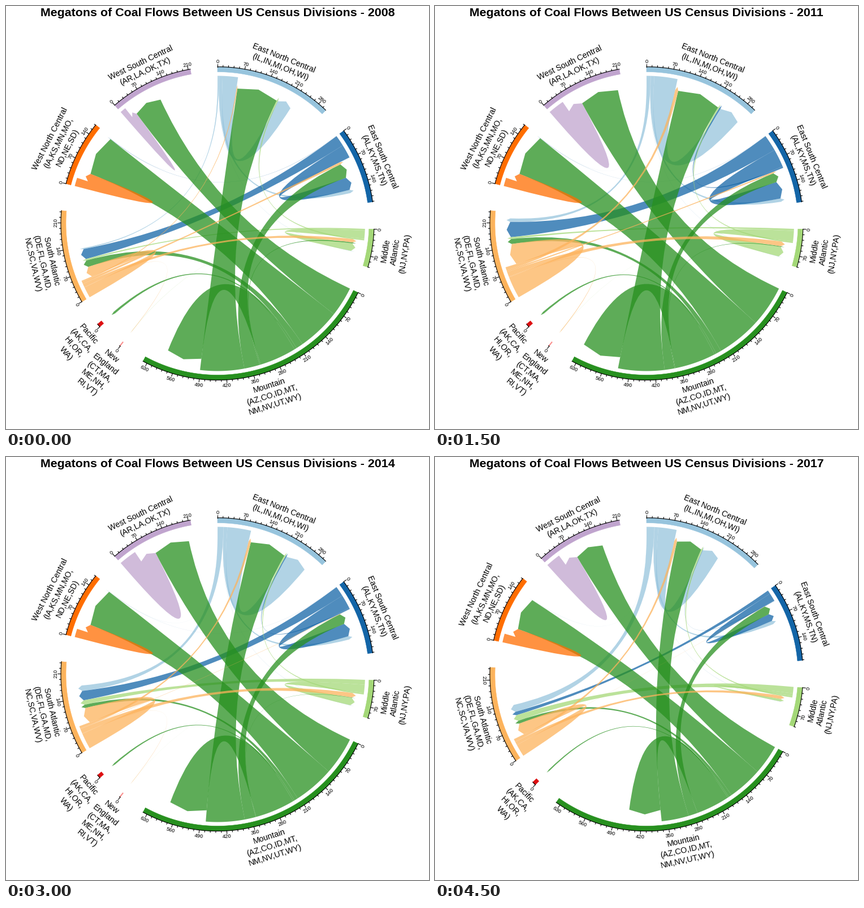
These frames come from a looping animation (748x748 px, 5 s). A matplotlib script:

```python
import numpy as np
import matplotlib.pyplot as plt
from matplotlib.animation import FuncAnimation
from matplotlib.patches import PathPatch, Polygon
from matplotlib.path import Path

SIZE, DPI = 748, 100
CX, CY = 374, 384.5
R_OUT, R_IN = 277, 268                  # coloured ring
R_FROM, R_TO, R_TIP = 261, 241, 247.5   # link start, arrow base, arrow tip
GAP = 10
UNIT = 0.1438                           # degrees per megaton with nine sectors
PT = 72 / DPI
FONT = "Liberation Sans"

# key: (arc in degrees, colour, label lines)
SECTORS = {
    "ENC": (43.7, "#97c4dd", "East North Central\n(IL,IN,MI,OH,WI)"),
    "ESC": (28.4, "#1365a7", "East South Central\n(AL,KY,MS,TN)"),
    "MA": (14.1, "#a4d878", "Middle\nAtlantic\n(NJ,NY,PA)"),
    "MT": (92.2, "#27901f", "Mountain\n(AZ,CO,ID,MT,\nNM,NV,UT,WY)"),
    "NE": (0.3, "#fa8a89", "New\nEngland\n(CT,MA,\nME,NH,\nRI,VT)"),
    "PA": (1.3, "#dd0f11", "Pacific\n(AK,CA,\nHI,OR,\nWA)"),
    "SA": (34.7, "#fdb35c", "South Atlantic\n(DE,FL,GA,MD,\nNC,SC,VA,WV)"),
    "WNC": (24.3, "#ff6d00", "West North Central\n(IA,KS,MN,MO,\nND,NE,SD)"),
    "WSC": (31.0, "#c0a4ce", "West South Central\n(AR,LA,OK,TX)"),
}
KEYS = list(SECTORS)

# Link widths in degrees: one value is constant, two are a steady trend,
# four are the levels of the market's phases 0 to 3.
FLOWS = {
    "ENC": dict(WNC=[.05], SA=[.45, 1.5, 2.3, 2.9], MA=[.1], ESC=[1.4],
                ENC=[6, 9.1, 9.3, 6.9]),
    "ESC": dict(WNC=[.08, 0], SA=[4.3, 6.4, 4, 1.4], ESC=[5.3, 7.1, 5.5, 3],
                ENC=[.05, .6, .45, .15]),
    "MA": dict(NE=[.05, 0], SA=[.65, .8, 1.9, 2.4], MA=[3.2, 4.1, 3.2, 1],
               ENC=[.6]),
    "MT": dict(WSC=[11.7, 16.1, 14.9, 11.3], WNC=[16.9, 17.4, 16, 13.1],
               SA=[2.8, 2.1, 1.4, 1.2], PA=[.9, .5],
               MT=[14.5, 16.2, 15.7, 12.7], MA=[.4, 0],
               ESC=[6.1, 3.9, 4.4, 3.5], ENC=[17.3, 18.2, 15.2, 10.3]),
    "SA": dict(SA=[4.3, 8.6, 6.3, 4.7], NE=[.12, .22, .1, 0],
               MA=[1.4, 2, 1.9, 1.3], ESC=[.9, .6, .15, .05],
               ENC=[.4, 1.3, 1, 1.1]),
    "WNC": dict(WNC=[3.3]),
    "WSC": dict(WSC=[2.3, 6.4, 7, 5.6]),
}


def phase(year):
    """Market phase: plateaus in 2009-11, 2012-14 and from 2016 on."""
    return np.interp(year, [2008, 2009, 2011, 2012, 2014, 2016, 2017],
                     [0, 1, 1, 2, 2, 2.95, 3])


def link_widths(year):
    p = phase(year)
    return {(s, d): np.interp(p, np.linspace(0, 3, len(v)), v)
            for s, row in FLOWS.items() for d, v in row.items()}


def polar(theta, r):
    """Point at theta degrees clockwise from the top."""
    a = np.radians(theta)
    return CX + r * np.sin(a), CY - r * np.cos(a)


def arc(a, b, r):
    t = np.linspace(a, b, int(abs(b - a) * 2) + 2)
    return np.column_stack(polar(t, r))


def is_low(theta):
    return 90 < theta % 360 < 270


def curved_text(s, theta, r, size):
    """Text along the circle, its capitals centred on radius r."""
    low = is_low(theta)
    drop = 0.36 * size
    x, y = polar(theta, r + drop if low else r - drop)
    ax.text(x, y, s, rotation=180 - theta if low else -theta,
            rotation_mode="anchor", ha="center", va="baseline",
            fontsize=size * PT, family=FONT)


def draw_sector(key, start, scale):
    width, color, label = SECTORS[key]
    end = start + width * scale
    ring = np.vstack([arc(start, end, R_OUT), arc(end, start, R_IN)])
    ax.add_patch(Polygon(ring, fc=color, ec=color, lw=0.4))
    ax.plot(*arc(start, end, R_OUT).T, color="black", lw=1.1 * PT)

    for i, t in enumerate(np.arange(start, end, 14 * UNIT * scale)):
        major = i % 5 == 0
        tick = polar(t, np.array([R_OUT, R_OUT + (5 if major else 2.6)]))
        ax.plot(*tick, color="black", lw=1.1 * PT)
        if major:
            curved_text(str(14 * i), t, 286.5, 9.5)

    mid = (start + end) / 2
    low = is_low(mid)
    lines = label.split("\n")
    for i, line in enumerate(lines if low else lines[::-1]):
        curved_text(line, mid, (300 if low else 298.5) + 17.3 * i, 14.24)


def draw_link(a0, a1, b0, b1, color):
    hub = (CX, CY)
    verts = [tuple(p) for p in arc(a0, a1, R_FROM)]
    codes = [Path.MOVETO] + [Path.LINETO] * (len(verts) - 1)
    verts += [polar(a1, R_TO), hub, polar(b0, R_TO),
              polar((b0 + b1) / 2, R_TIP), polar(b1, R_TO),
              hub, polar(a0, R_TO), verts[0]]
    codes += [Path.LINETO, Path.CURVE3, Path.CURVE3,
              Path.LINETO, Path.LINETO,
              Path.CURVE3, Path.CURVE3, Path.CLOSEPOLY]
    ax.add_patch(PathPatch(Path(verts, codes), fc=color, alpha=0.745, lw=0))


def draw(i):
    year = 2008 + i
    ax.clear()
    ax.set(xlim=(0, SIZE), ylim=(SIZE, 0))
    ax.axis("off")
    ax.text(CX, 18.3,
            f"Megatons of Coal Flows Between US Census Divisions - {year}",
            ha="center", va="baseline", weight="bold", family=FONT,
            fontsize=21.35 * PT)

    # a sector without any trade leaves the circle
    width = {pair: w for pair, w in link_widths(year).items() if w > 0}
    used = {k for pair in width for k in pair}
    keys = [k for k in KEYS if k in used]
    scale = (360 - GAP * len(keys)) / sum(SECTORS[k][0] for k in keys)

    pos, start = {}, 0
    for k in keys:
        draw_sector(k, start, scale)
        pos[k] = start
        start += SECTORS[k][0] * scale + GAP

    def place(pair, key):
        a = pos[key]
        pos[key] = a + width[pair] * scale
        return a, pos[key]

    # outgoing links fill each sector first, then incoming ones
    pairs = [(s, d) for s in KEYS for d in KEYS[::-1] if (s, d) in width]
    out = {p: place(p, p[0]) for p in pairs}
    into = {p: place(p, p[1])
            for p in sorted(pairs, key=lambda p: -KEYS.index(p[0]))}
    for p in pairs:
        draw_link(*out[p], *into[p], SECTORS[p[0]][1])
    return []


fig = plt.figure(figsize=(SIZE / DPI, SIZE / DPI), dpi=DPI, facecolor="white")
ax = fig.add_axes([0, 0, 1, 1])
anim = FuncAnimation(fig, draw, frames=10, interval=500, repeat=True,
                     repeat_delay=0, init_func=lambda: draw(0))
plt.show()
```
